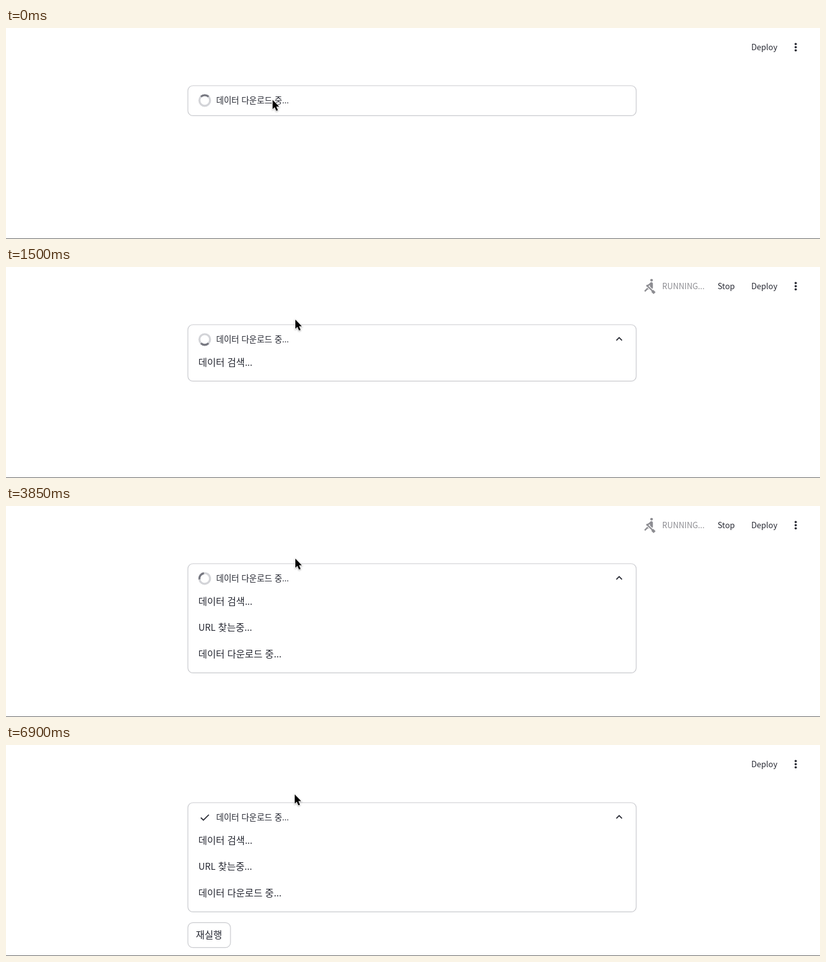
Write an HTML page that moves like this. It is 1280x333 px and loops after 6.95 s.

```html
<!DOCTYPE html>
<html lang="ko">
<head>
<meta charset="utf-8">
<title>데이터 다운로드</title>
<style>
  html, body { margin: 0; width: 100%; height: 100%; overflow: hidden; background: #fff; }
  #stage { display: block; width: 100%; height: 100%; }
  text { font-family: "Noto Sans CJK KR", "Noto Sans CJK", sans-serif; fill: #262832; }
  .line { fill: none; stroke: #262832; stroke-width: 1.7; }
  .frame { fill: none; stroke: #cbccd0; stroke-width: 1.2; }
  .hover text { fill: #cf383c; }
  .hover .line { stroke: #cf383c; }
  #running path, #running text { fill: #8d8d92; }
  #running text.dark { fill: #262832; }
  #arrow, #hand { filter: drop-shadow(0 1px 1px rgba(0, 0, 0, .3)); }
</style>
</head>
<body>
<svg id="stage" viewBox="0 0 1280 333">
  <defs><clipPath id="clip"><rect id="clipRect" x="286" y="91" width="705" height="48"/></clipPath></defs>
  <rect y="332" width="1280" height="1" fill="#707070"/>

  <g id="running">
    <g transform="translate(999.4 17.6) scale(1.05)">
      <path class="pose" d="M18 2.54a2 2 0 1 1 0 4 2 2 0 1 1 0-4zM15 17h-2c0 1.65-1.35 3-3 3s-3-1.35-3-3 1.35-3 3-3v-2c-2.76 0-5 2.24-5 5s2.24 5 5 5 5-2.24 5-5zm3-3.5h-1.86l1.67-3.67C18.42 8.5 17.44 7 15.96 7h-5.2c-.81 0-1.54.47-1.87 1.2L8.22 10l1.92.53.65-1.53H13l-1.83 4.1c-.6 1.33.39 2.9 1.85 2.9H18v5h2v-5.5c0-1.1-.9-2-2-2z"/>
      <path class="pose" d="M8.5 14.5L4 19l1.5 1.5L9 17h2zM15 1c-1.1 0-2 .9-2 2s.9 2 2 2 2-.9 2-2-.9-2-2-2zm6 20.01L18 24l-2.99-3.01V19.5l-7.1-7.09c-.31.05-.61.07-.91.07v-2.16c1.66.03 3.61-.87 4.67-2.04l1.4-1.55c.19-.21.43-.38.69-.5.29-.14.62-.23.96-.23h.03C15.99 6.01 17 7.02 17 8.26v5.75c0 .84-.35 1.61-.92 2.16l-3.58-3.58v-2.27c-.63.52-1.43 1.02-2.29 1.39L16.5 18H18z"/>
      <path class="pose" d="M12 2c1.1 0 2 .9 2 2s-.9 2-2 2-2-.9-2-2 .9-2 2-2zm9 7h-6v13h-2v-6h-2v6H9V9H3V7h18z"/>
    </g>
    <text x="1031.7" y="35.2" data-size="14">RUNNING...</text>
    <text x="1119" y="35.2" data-size="14" class="dark">Stop</text>
  </g>
  <text x="1172" y="35.2" data-size="14">Deploy</text>
  <g fill="#262832">
    <circle cx="1241.8" cy="25.2" r="1.8"/>
    <circle cx="1241.8" cy="30.2" r="1.8"/>
    <circle cx="1241.8" cy="35.2" r="1.8"/>
  </g>

  <rect id="box" class="frame" x="286" y="91" width="705" height="47.4" rx="8"/>
  <g id="header">
    <text x="330.4" y="119.2" data-size="14">데이터 다운로드 중...</text>
    <path id="chevron" class="line" d="M959.8 115.8l4.4-4.4 4.4 4.4"/>
  </g>
  <g id="spinner" fill="none" stroke-width="3.2">
    <circle cx="312.5" cy="114.4" r="8.4" stroke="#d3d4d8"/>
    <path d="M306.56 108.46a8.4 8.4 0 0 1 11.88 0" stroke="#777881"/>
  </g>
  <path id="check" class="line" d="M306.4 114.6l4 4L319 110"/>
  <g clip-path="url(#clip)">
    <text class="row" x="302.4" y="155.6" data-size="16">데이터 검색...</text>
    <text class="row" x="302.4" y="197.3" data-size="16">URL 찾는중...</text>
    <text class="row" x="302.4" y="238.9" data-size="16">데이터 다운로드 중...</text>
  </g>
  <g id="button">
    <rect class="frame" x="286" y="280.3" width="67" height="39.4" rx="8"/>
    <text x="298.4" y="305" data-size="16">재실행</text>
  </g>

  <g id="cursor">
    <path id="arrow" d="M0 0V14.4L3.2 11.4 5.7 17.3 8.3 16.2 5.8 10.4H10.2Z" stroke="#fff" stroke-width="1.6" paint-order="stroke"/>
    <g id="hand" stroke="#000" stroke-width="1.2" stroke-linejoin="round">
      <path fill="#fff" d="M-1.6 9V1.3Q-1.6 0 0 0T1.6 1.3V6.2Q2 5 3.2 5.2 4.5 5.4 4.6 6.8 5.2 5.8 6.3 6.1 7.4 6.4 7.4 7.6 8 7 8.8 7.3 9.8 7.7 9.7 9.2 9.7 12 8.3 13.8V16.3H.6V14.8Q-1.5 12.5-3 10.4L-4.8 8.6Q-5.2 7.2-4 7-3 6.8-1.6 9Z"/>
      <path d="M2 10.5v3.4M4.3 10.5v3.4M6.6 10.5v3.4" stroke-width="1"/>
    </g>
  </g>
</svg>
<script>
const LOOP = 6950;
const RUN_START = 350, DONE = 4640;
const ROW_TIMES = [682, 1980, 3310];
const BOX_HEIGHTS = [47.4, 89.2, 130.8, 172.4];
const CURSOR_PATH = [[0, 419.3, 113.5], [400, 419.3, 113.5], [680, 420.5, 117.6],
  [850, 420.5, 117.6], [1150, 455, 83], [6550, 455, 83], [6850, 454, 78]];

const $ = id => document.getElementById(id);
const show = (el, on) => { el.style.display = on ? "" : "none"; };
const rows = [...document.querySelectorAll(".row")];
const poses = [...document.querySelectorAll(".pose")];

// Hangul and Latin parts have different optical sizes in the interface face.
for (const label of document.querySelectorAll("text")) {
  const size = +label.dataset.size;
  const parts = label.textContent.match(/[ -~]+|[^ -~]+/g);
  label.textContent = "";
  for (const part of parts) {
    const span = document.createElementNS(label.namespaceURI, "tspan");
    span.textContent = part;
    span.style.fontSize = size * (/[ -~]/.test(part) ? 0.895 : 0.941) + "px";
    label.append(span);
  }
}

function cursorAt(t) {
  const next = CURSOR_PATH.findIndex(p => p[0] > t);
  if (next < 0) return CURSOR_PATH.at(-1).slice(1);
  const [t0, x0, y0] = CURSOR_PATH[next - 1], [t1, x1, y1] = CURSOR_PATH[next];
  const p = (t - t0) / (t1 - t0), k = p * p * (3 - 2 * p);
  return [x0 + (x1 - x0) * k, y0 + (y1 - y0) * k];
}

function boxHeight(t, count) {
  if (count !== 1) return BOX_HEIGHTS[count];
  const p = Math.min(1, (t - ROW_TIMES[0]) / 500);
  return BOX_HEIGHTS[0] + (BOX_HEIGHTS[1] - BOX_HEIGHTS[0]) * (1 - (1 - p) ** 3);
}

function draw(t) {
  const count = ROW_TIMES.filter(start => t >= start).length;
  const done = t >= DONE;
  const height = boxHeight(t, count);
  $("box").setAttribute("height", height);
  $("clipRect").setAttribute("height", height);
  rows.forEach((row, i) => show(row, i < count));

  show($("running"), t >= RUN_START && !done);
  poses.forEach((pose, i) => show(pose, Math.floor(t / 200) % 3 === i));
  show($("chevron"), count > 0);
  show($("spinner"), !done);
  $("spinner").setAttribute("transform", `rotate(${t * 0.36} 312.5 114.4)`);
  show($("check"), done);
  show($("button"), done);

  const [x, y] = cursorAt(t);
  const hover = count > 0 && y > 91;
  $("header").classList.toggle("hover", hover);
  show($("hand"), hover);
  show($("arrow"), !hover);
  $("cursor").setAttribute("transform", `translate(${x} ${y})`);
}

const start = performance.now();
function tick() {
  draw((performance.now() - start) % LOOP);
  requestAnimationFrame(tick);
}
tick();
</script>
</body>
</html>
```
